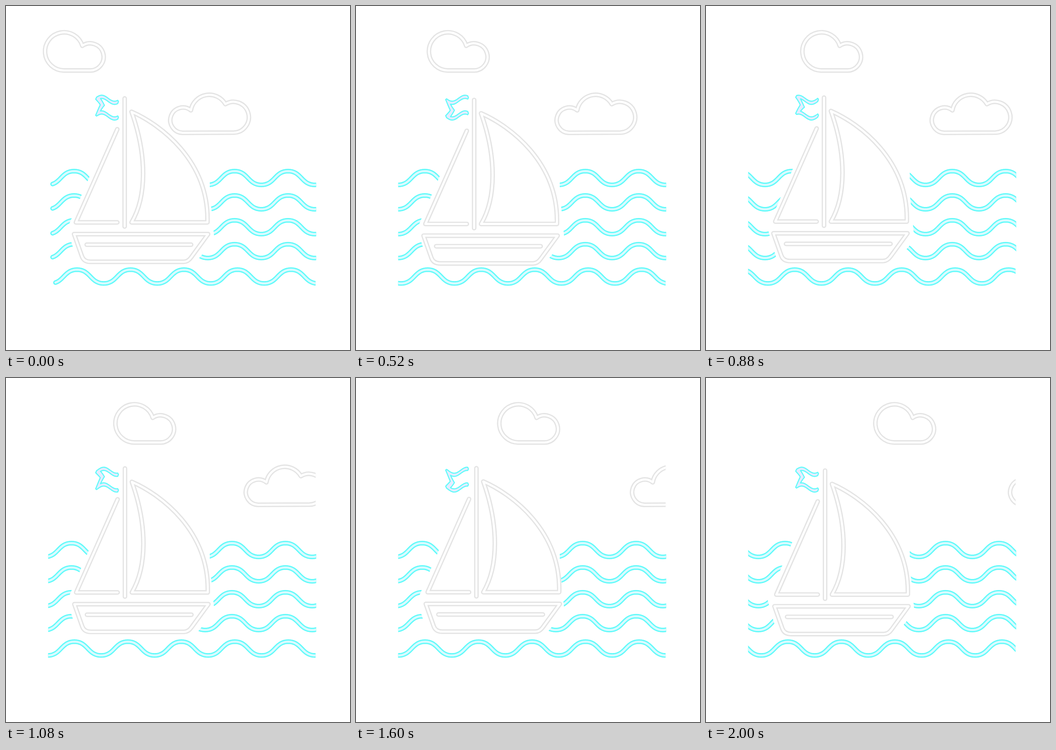
Animation, 748 px wide and 748 px high, one loop 2040 ms. Source, as an HTML page:

```html
<!DOCTYPE html>
<html lang="en">
<head>
<meta charset="utf-8">
<title>Sailing boat</title>
<style>
  html, body { margin: 0; width: 100%; height: 100%; overflow: hidden; background: #fff; }
  svg { display: block; width: 100vw; height: 100vh; }
  path { fill: none; stroke-linecap: round; stroke-linejoin: round; }
  .edge { stroke: #e4e4e4; stroke-width: 10; }
  .core { stroke: #fff; stroke-width: 4.6; }
  .sea .edge { stroke: #62fafa; }
  .sea .core { stroke: #d9fbff; }
  #flag { fill: #e6ecff; stroke: #62fafa; stroke-width: 2.4; }
  #gap { fill: #fff; }
</style>
</head>
<body>
<svg viewBox="0 0 748 748">
  <defs>
    <clipPath id="seaClip"><rect x="91.7" y="300" width="582.8" height="262"/></clipPath>
    <clipPath id="baseClip"><rect x="91.5" y="562" width="581.7" height="60"/></clipPath>
    <clipPath id="skyClip"><rect width="673.3" height="300"/></clipPath>
  </defs>
  <g clip-path="url(#skyClip)"><g id="cloudA"></g><g id="cloudB"></g></g>
  <g class="sea" clip-path="url(#seaClip)"><g id="rows"></g></g>
  <!-- clear water around the boat -->
  <polygon id="gap" points="195,340 134,482 142,513 157,560 411,560 418,550.5 448,514.5 453,507 452.5,501 449,465 443,408 443,340"/>
  <g class="sea" clip-path="url(#baseClip)"><g id="base"></g></g>
  <g id="boat"></g>
  <path id="flag"/>
</svg>
<script>
const LOOP = 2040, STEP = 40;
const PERIOD = 116.3, HALF = PERIOD / 2;
const $ = id => document.getElementById(id);

function tube(id, ...paths) {
  $(id).innerHTML = paths.map(d =>
    `<path class="edge" d="${d}"/><path class="core" d="${d}"/>`).join('');
}

// Water line from just after a trough at x0, swinging 15 px about midY.
function wave(x0, midY) {
  const pts = [];
  for (let n = 0; n < 19; n++) {
    for (let i = 0; i < 20; i++) {
      const t = i / 20;
      if (n === 0 && t < 0.15) continue;
      const x = x0 + HALF * (n + 1.5 * t - 1.5 * t * t + t * t * t);
      const rise = 30 * t * t * (3 - 2 * t) - 15;
      pts.push(x.toFixed(2) + ' ' + (midY + (n % 2 ? rise : -rise)).toFixed(2));
    }
  }
  return 'M' + pts.join('L');
}

tube('cloudA', 'M126 140.2A41.5 41.5 0 1 1 166 86.5A29.5 29.5 0 1 1 182 140.2Z');
tube('cloudB', 'M384 275.7A27.5 27.5 0 1 1 402 226.8A40.5 40.5 0 0 1 477 213.3A33.5 33.5 0 1 1 496 275.3Z');
tube('rows', ...[374, 427, 481, 533].map(y => wave(90, y)));
tube('base', wave(96.3, 588.3));
tube('boat',
  'M258 201V479.5',
  'M242 268L152 470.5H242',
  'M273 230C335 257 442 336 438 470.5H273C306 415 307 325 273 230Z',
  'M148 496H439.5L403 546Q396 556.3 386 556.3H184Q169 556.3 165 544Z',
  'M175.5 519H402.5');

// Flag outline at rest
const ribbon = [
  [243, 200.5], [197, 200.5], [195, 203.5], [205, 221], [195, 238.5], [197, 241.5], [243, 241.5],
  [244.5, 238], [243, 234.5], [205.5, 234.5], [214, 221], [205.5, 207.5], [243, 207.5], [244.5, 204]
];

function flagPath(t) {
  const crest = 208 + 0.056 * t;
  const pts = [];
  ribbon.forEach(([x, y], i) => {
    const [u, v] = ribbon[(i + 1) % ribbon.length];
    const n = Math.ceil(Math.hypot(u - x, v - y) / 2);
    for (let k = 0; k < n; k++) {
      const px = x + (u - x) * k / n, py = y + (v - y) * k / n;
      const lift = 6.5 * Math.cos((px - crest) / 56 * 2 * Math.PI);
      pts.push(px.toFixed(2) + ' ' + (py - lift).toFixed(2));
    }
  });
  return 'M' + pts.join('L') + 'Z';
}

// Boat drift: time, x, y
const drift = [
  [0, 0, 0], [240, 0.5, 2.7], [520, -1.1, 3.4], [880, -1.4, -1.7],
  [1320, 3.4, -6.3], [1600, 3.8, -4.8], [2000, 0.9, 0.4]
];

function slope(i, c) {
  const a = drift[Math.max(i - 1, 0)], b = drift[Math.min(i + 1, drift.length - 1)];
  return (b[c] - a[c]) / (b[0] - a[0]);
}

function driftAt(t, c) {
  let i = 0;
  while (i < drift.length - 2 && t >= drift[i + 1][0]) i++;
  const a = drift[i], b = drift[i + 1], d = b[0] - a[0];
  const s = Math.min((t - a[0]) / d, 1), r = 1 - s;
  return a[c] * r * r * (1 + 2 * s) + b[c] * s * s * (3 - 2 * s)
    + d * s * r * (slope(i, c) * r - slope(i + 1, c) * s);
}

const move = (id, x, y = 0) => $(id).setAttribute('transform', `translate(${x} ${y})`);

function draw(t) {
  move('cloudA', 0.1417 * t);
  move('cloudB', 0.152 * t);
  move('rows', -0.2207 * t);
  move('base', -0.2207 * t);
  move('boat', driftAt(t, 1), driftAt(t, 2));
  $('flag').setAttribute('d', flagPath(t));
}

const start = performance.now();
function tick() {
  const t = (performance.now() - start) % LOOP;
  draw(Math.floor(t / STEP) * STEP);
  requestAnimationFrame(tick);
}
tick();
</script>
</body>
</html>
```
